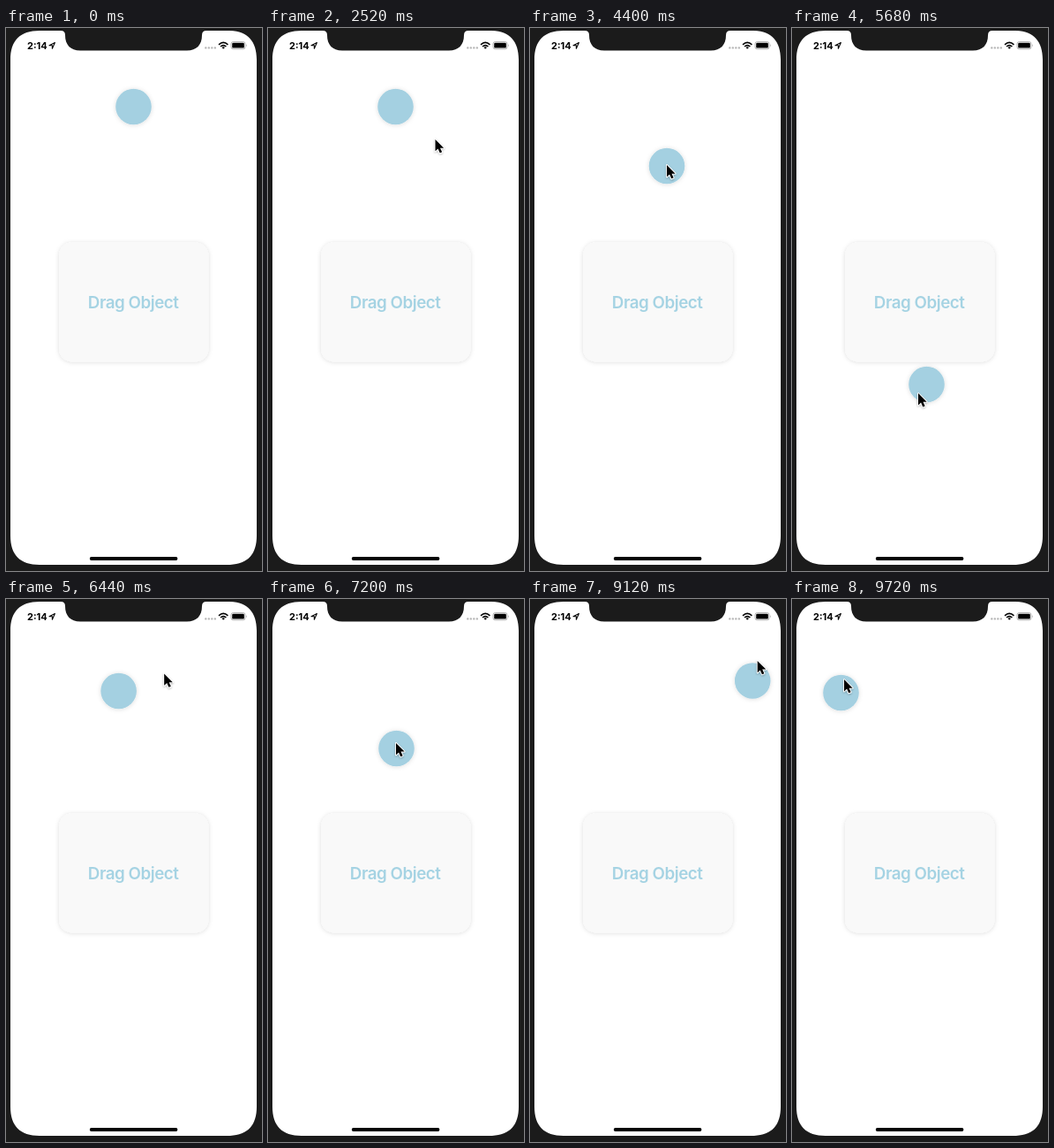
These frames come from a looping animation (290x614 px, 9760 ms). An HTML page:

```html
<!DOCTYPE html>
<html lang="en">
<head>
<meta charset="utf-8">
<title>Drag Object</title>
<style>
html, body { margin: 0; width: 100%; height: 100%; overflow: hidden; background: #1b1b1b; }
svg { display: block; width: 290px; height: 614px; }
text { font-family: Inter, Roboto, sans-serif; }
</style>
</head>
<body>
<svg viewBox="0 0 290 614">
  <defs>
    <filter id="soft" x="-30%" y="-30%" width="160%" height="160%">
      <feDropShadow dx="0" dy=".5" stdDeviation="2.8" flood-color="#000" flood-opacity=".14"/>
    </filter>
    <filter id="arrowShade" x="-40%" y="-30%" width="180%" height="170%">
      <feDropShadow dx="0" dy="1" stdDeviation=".8" flood-color="#000" flood-opacity=".3"/>
    </filter>
  </defs>
  <rect width="290" height="614" fill="#1b1b1b"/>
  <path fill="#fff" d="M38 3H62Q67 3 67 8C67 19 73 25.5 84 25.5H205C216 25.5 222 19 222 8Q222 3 227 3H251C273 3 284 14 284 36V574C284 596 273 607 251 607H38C16 607 5 596 5 574V36C5 14 16 3 38 3Z"/>

  <text x="24" y="23.6" font-size="11" font-weight="700">2:14</text>
  <path d="M55.4 16.6L52.4 23.2V19.8H49Z" fill="none" stroke="#000" stroke-width="1.1" stroke-linejoin="round"/>
  <path d="M226.3 22.4H237" stroke="#b5b5b5" stroke-width="2.4" stroke-linecap="round" stroke-dasharray="0 3.5"/>
  <g fill="none" stroke="#000" stroke-width="1.6">
    <path d="M241 18.8Q246.2 14 251.4 18.8M243 21Q246.2 18.1 249.4 21"/>
    <path d="M244.4 21.9Q246.2 20.6 248 21.9L246.2 23.8Z" fill="#000" stroke="none"/>
  </g>
  <rect x="255" y="15.6" width="16" height="8.2" rx="2.3" fill="none" stroke="#aaa" stroke-width=".9"/>
  <rect x="256.2" y="16.8" width="13.6" height="5.8" rx="1.2"/>
  <path d="M272 18.2Q273.4 19.7 272 21.2Z" fill="#999"/>
  <rect x="94.8" y="598" width="99.6" height="3.9" rx="1.9"/>

  <rect x="60" y="242.5" width="169.5" height="135" rx="15" fill="#f9f9f9" filter="url(#soft)"/>
  <text x="144.1" y="316.8" font-size="18.8" font-weight="600" letter-spacing="-.48" text-anchor="middle" fill="#a5d3e3">Drag Object</text>

  <circle id="ball" r="20.3" fill="#a4d0e1" filter="url(#soft)"/>
  <g id="arrow" filter="url(#arrowShade)">
    <path transform="scale(.9)" d="M0 0V14.8L3.4 11.7L5.8 17L8.5 15.9L6.1 10.7H10.7Z" stroke="#fff" stroke-width="2" paint-order="stroke" stroke-linejoin="round"/>
  </g>
</svg>
<script>
const LOOP = 9760, STEP = 40;
const LEAD = 80; // ms by which the pointer runs ahead of the ball
const PAUSES = [[5040, 5160], [7200, 7960]];
const ball = document.getElementById("ball");
const arrow = document.getElementById("arrow");

// A pose: time, place, pointer offset, and the swing made on the way to it
const pose = (t, x, y, tipX = 0, tipY = 0, swingX = 0, swingY = 0, phase = 0) =>
  ({ t, phase, x: [x, tipX / LEAD, swingX], y: [y, tipY / LEAD, swingY] });

const approach = [
  pose(2720, 174, 118),
  pose(3320, 144.5, 89, 0, 0, 18, 30)
];
const drag = [
  pose(3600, 144.5, 89),
  pose(4400, 155, 156, 0, -1, -65, -40),
  pose(5560, 152.5, 403, -9.5, 10, 38, -180, -0.2),
  pose(7080, 145.5, 169, -0.5, -6, -150, 220),
  pose(7720, 174.5, 136, 3.5, -38, -75, -60),
  pose(8840, 55.5, 106, 3.5, -15, 135, 75, -0.5)
];

// Smooth travel from a to b plus a loop that fades out at both ends
function travel(a, b, axis, t) {
  const d = b.t - a.t, u = Math.min(1, Math.max(0, (t - a.t) / d));
  const [p, v] = a[axis], [q, w, swing] = b[axis];
  const ease = u * u * (3 - 2 * u);
  const turn = Math.PI * (2 * u + b.phase);
  const wave = axis === "x" ? Math.sin(turn) : Math.cos(turn);
  return p + (q - p) * ease + d * u * (1 - u) * (v * (1 - u) - w * u)
    + swing * Math.sin(Math.PI * u) ** 2 * wave;
}

function at(poses, t) {
  const i = Math.max(1, poses.findIndex(p => p.t >= t));
  const end = t > poses[poses.length - 1].t ? poses.length - 1 : i;
  return ["x", "y"].map(axis => travel(poses[end - 1], poses[end], axis, t));
}

function lead(poses, t) {
  const now = at(poses, t), from = at(poses, t - 1), to = at(poses, t + 1);
  const span = Math.min(t + 1, poses[poses.length - 1].t) - Math.max(t - 1, poses[0].t);
  return now.map((p, k) => p + LEAD * (to[k] - from[k]) / span);
}

function activeTime(t) {
  return PAUSES.reduce((s, [from, to]) => s - Math.min(Math.max(t - from, 0), to - from), t);
}

function place(el, [x, y]) {
  el.setAttribute("transform", `translate(${x.toFixed(2)} ${y.toFixed(2)})`);
}

function render(time) {
  const t = Math.floor((time % LOOP) / STEP) * STEP;
  const s = activeTime(t);
  place(ball, at(drag, s));
  arrow.style.display = t < 2520 ? "none" : "";
  if (t < 2560) place(arrow, [189.5, 126]);
  else if (t < 3600) place(arrow, at(approach, t));
  else place(arrow, lead(drag, s));
}

const start = performance.now();
function tick() {
  render(performance.now() - start);
  requestAnimationFrame(tick);
}
tick();
</script>
</body>
</html>
```
